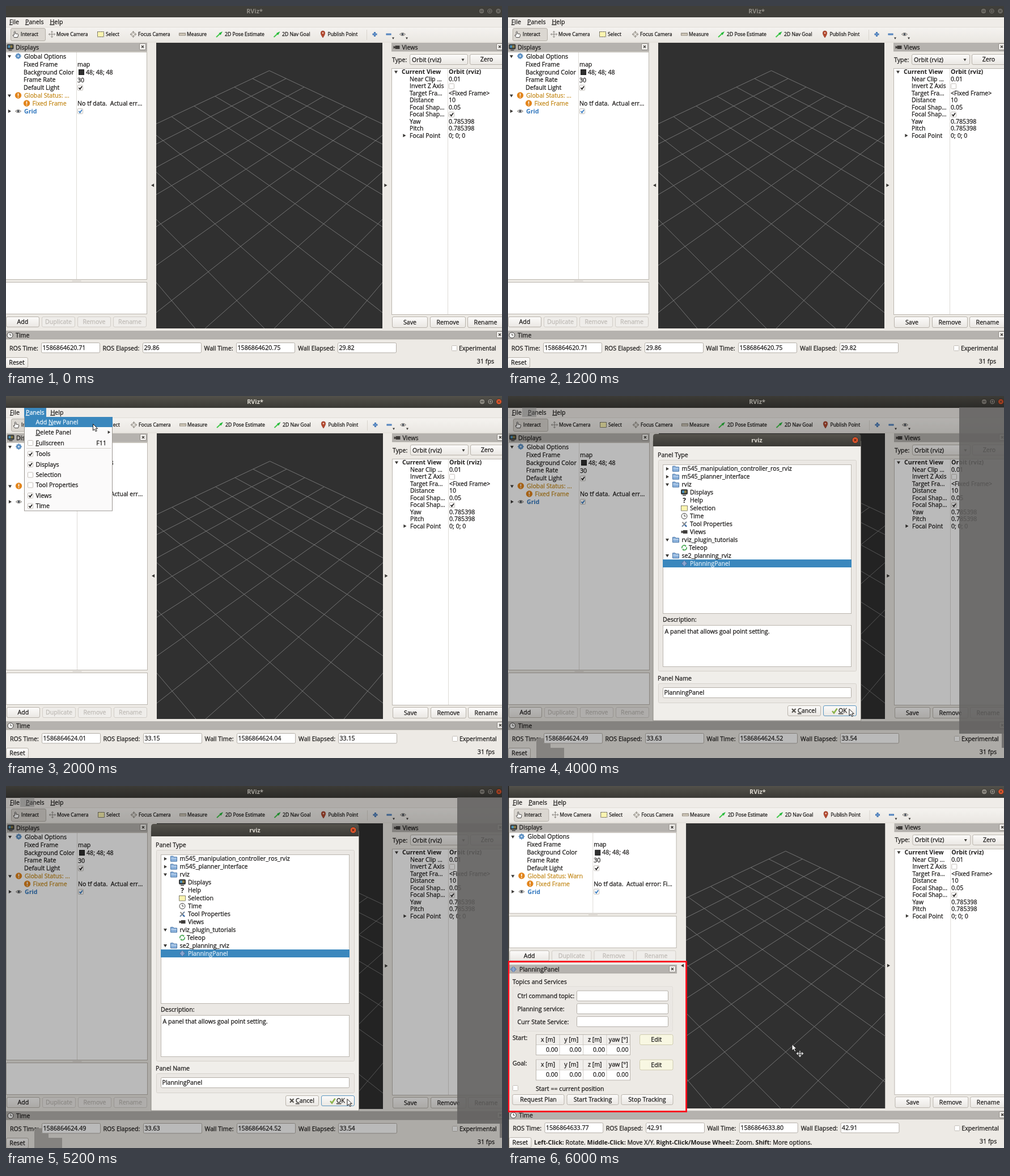
Animation, 875 px wide and 640 px high, one loop 8000 ms. Source, as an HTML page:

```html
<!DOCTYPE html>
<html lang="en">
<head>
<meta charset="utf-8">
<title>RViz</title>
<style>
html, body { margin: 0; width: 100%; height: 100%; overflow: hidden; background: #edeae5; }
#stage { display: block; width: 875px; height: 640px; }
text { font-family: "Open Sans", "Noto Sans", sans-serif; white-space: pre; stroke-width: .28px; }
.u { text-decoration: underline; }
.b { font-weight: bold; }
</style>
</head>
<body>
<svg id="stage" viewBox="0 0 875 640" xmlns="http://www.w3.org/2000/svg"></svg>
<script>
const STEP = 2000, BLUE = '#3a87bd', INK = '#1f1d1c', BAR = '#b5b2ae', EDGE = '#bbb6af';

// ---- primitives (y of text is its visual middle) ----
const rect = (x, y, w, h, fill, stroke = 'none', r = 0, more = '') =>
  `<rect x="${x}" y="${y}" width="${w}" height="${h}" rx="${r}" fill="${fill}" stroke="${stroke}" ${more}/>`;
const path = (d, stroke, w = 1, fill = 'none') =>
  `<path d="${d}" stroke="${stroke}" stroke-width="${w}" fill="${fill}"/>`;
const disc = (x, y, r, fill, stroke = 'none') =>
  `<circle cx="${x}" cy="${y}" r="${r}" fill="${fill}" stroke="${stroke}"/>`;
const text = (x, y, s, { size = 10.65, fill = INK, bold = false, at = 'start' } = {}) =>
  `<text x="${x}" y="${y + size * 0.34}" font-size="${size}" fill="${fill}" stroke="${bold ? 'none' : fill}" text-anchor="${at}"${bold ? ' class="b"' : ''}>${s}</text>`;
const key = (s, i = 0) => `${s.slice(0, i)}<tspan class="u">${s[i]}</tspan>${s.slice(i + 1)}`;
const move = (x, y, s) => `<g transform="translate(${x} ${y})">${s}</g>`;

// ---- widgets ----
const box = (x, y, w, h) => rect(x + .5, y + .5, w - 1, h - 1, '#fff', EDGE);
const field = (x, y, w, h, s = '') => rect(x + .5, y + .5, w - 1, h - 1, '#fff', '#b3aea7', 2) + text(x + 2.5, y + h / 2, s);
const button = (x, y, w, h, s, { off = false, fill = 'url(#btn)', edge = '#b8b3ab' } = {}) =>
  rect(x + .5, y + .5, w - 1, h - 1, off ? '#efedea' : fill, off ? '#d2cec8' : edge, 2.5) +
  text(x + w / 2, y + h / 2, s, { at: 'middle', fill: off ? '#bfbbb6' : INK });
const check = (x, y, on, fill = INK) => rect(x + .5, y + .5, 9, 9, '#fff', '#c3beb8', 1) +
  (on ? path(`M${x + 2.5} ${y + 5}l2 2.5 3.5-5`, fill, 1.7) : '');
const tri = (x, y, dir, s = 3, fill = '#3a3835') =>
  `<path d="M${-s} ${-s * .7}H${s}L0 ${s}Z" fill="${fill}" transform="translate(${x} ${y}) rotate(${{ d: 0, l: 90, r: -90 }[dir]})"/>`;
const shut = (x, y) => rect(x + .5, y + .5, 11, 11, '#f1efec', '#918d87', 1.5) +
  path(`M${x + 4} ${y + 4}l4 4m0-4l-4 4`, '#45423e', 1.5);
const dock = (x, y, w, title, tx) => rect(x, y, w, 15, BAR) + path(`M${x} ${y + 15}h${w}`, '#9f9b96', .7) + text(tx, y + 8, title);

// ---- icons, drawn around 0,0 ----
const icons = {
  hand: path('M-2.5 1V-4.500Q-1.500-6-.5-4.500V-1L4-.5Q5 0 4.500 2L3.500 5.500H-2.500L-5 2Q-4.500 0-2.500 2', '#4a4744', 1, '#fff'),
  cross: path('M0-5.500V5.500M-5.500 0H5.500M-1.800-3.700L0-5.500 1.800-3.700M-1.800 3.700L0 5.500 1.800 3.700M-3.700-1.800L-5.500 0-3.700 1.800M3.700-1.800L5.500 0 3.700 1.800', '#85827d', 1),
  select: rect(-5.5, -4.5, 11, 9, '#fbf4b0', '#5c5a4e', 0, 'stroke-dasharray="2 .7"'),
  focus: path('M0-5.500L5.500 0 0 5.500-5.500 0Z', '#aaa69f', 1, '#d7d3cc') + path('M0-5.500V5.500M-5.500 0H5.500', '#87837c', 1) + disc(0, 0, 1.6, '#f4f2ee'),
  ruler: rect(-5.5, -2, 11, 4, '#ddd5c5', '#8a8378') + path('M-3-2v2M0-2v2M3-2v2', '#736d63', .7),
  arrow: path('M-5.500 5L1.500-1.500', '#42c84a', 2) + path('M5.500-5L-1-2 2 1.500Z', 'none', 0, '#25b83a'),
  pin: path('M0 6Q-4 0-3.600-2.500A3.600 3.600 0 0 1 3.600-2.500Q4 0 0 6Z', '#8d3422', .7, '#b4492f') + disc(0, -2.3, 1.3, '#f0d3c9'),
  plus: path('M-4 0H4M0-4V4', '#3d70b0', 3) + path('M-3 0H3M0-3V3', '#76a4d8', 1),
  minus: path('M-4.500 0H4.500', '#3d70b0', 3) + path('M-3.500 0H3.500', '#76a4d8', 1),
  eye: path('M-5 0Q0-5 5 0Q0 5-5 0Z', '#77736d', 1, '#eceae6') + disc(0, 0, 2, '#4b525c'),
  screen: rect(-5.5, -5, 11, 8, '#2d3438', '#3b3a38', 1) + path('M-4-3.500H0V1H-4Z', 'none', 0, '#4c92b8') + path('M0-3.500H4V1H0Z', 'none', 0, '#8c7a42') + path('M-3 5H3', '#444', 1.6),
  gear: disc(0, 0, 4, '#6ea0d0', '#4f82b5') + path('M0-5.500V5.500M-5.500 0H5.500M-3.700-3.700L3.700 3.700M3.700-3.700L-3.700 3.700', '#5f91c3', 1.3) + disc(0, 0, 1.5, '#d9e7f4'),
  warn: disc(0, 0, 5.7, '#e2851c') + path('M0-3.500V1M0 2.200V3.700', '#fff', 1.6),
  camera: path('M-5.500-2.500L-2.500-1V-3H5.500V3H-2.500V1L-5.500 2.500Z', 'none', 0, '#3e3b39'),
  clock: disc(0, 0, 5, '#fafafa', '#403e3b') + path('M0-3V0H2.500', '#403e3b', 1),
  folder: path('M-5.500 4.500V-4.500H-1L0-3H5.500V4.500Z', '#4673a5', 1, '#8db3dd') + path('M-5-.8H5', '#d3e3f3', 1),
  tools: path('M-4 4.500L4-4', '#6b7f97', 2) + path('M4 4.500L-3.500-3.500', '#8d8984', 2) + path('M1 1.500L4 4.500', '#3c6fae', 2.4),
  cycle: path('M-4 1A4 4 0 0 1 2-3.500M4-1A4 4 0 0 1-2 3.500', '#52ad5c', 1.7) + path('M1-5.500L4-3 1-1.500ZM-1 5.500L-4 3-1 1.500Z', 'none', 0, '#52ad5c'),
  gem: path('M0-5L5 0 0 5-5 0Z', '#4d6ca0', 1, '#7f9dc9') + path('M0-5V5', '#aac0e0', .7),
  pointer: path('M0 0V11.500L2.700 9 4.700 13.200 6.700 12.300 4.700 8.200H8.200Z', '#1c1b1a', 1, '#fff')
};
const icon = (name, x, y) => move(x, y, icons[name]);

// ---- main window ----
const titleBar = live => {
  const rim = live ? '#8b8880' : '#6b6963';
  const dot = (x, fill) => disc(x, 9, 5, fill, '#35332f');
  return rect(-3, -2, 882, 22, live ? 'url(#bar)' : '#403f3a') +
    text(438.5, 9, 'RViz*', { bold: true, at: 'middle', size: 10.8, fill: live ? '#dcd8cf' : '#918e87' }) +
    dot(839, rim) + dot(853.5, rim) + dot(868.5, live ? '#e2562c' : rim) +
    path('M836.500 9h5', '#3a3834', 1) + rect(851.5, 7, 4, 4, 'none', '#3a3834') + path('M866.500 7l4 4m0-4l-4 4', '#3a3834', 1);
};

const toolBar = () => {
  const tools = [['hand', 17, 26, 'Interact'], ['cross', 81, 89, 'Move Camera'], ['select', 167, 176, 'Select'],
    ['focus', 224.5, 233, 'Focus Camera'], ['ruler', 311, 319, 'Measure'], ['arrow', 376.5, 386, '2D Pose Estimate'],
    ['arrow', 478, 487, '2D Nav Goal'], ['pin', 559, 567.5, 'Publish Point']];
  return rect(-3, 20, 882, 18, '#efece8') + rect(-3, 37, 882, 27, 'url(#tool)') +
    path('M-3 37.500H879M-3 64H879', '#dcd8d1', .8) +
    text(6, 28, key('File')) + text(34, 28, key('Panels')) + text(77.5, 28, key('Help')) +
    rect(8.5, 39.5, 61, 22, '#dbd7d1', '#b4afa7', 2.5) +
    tools.map(([n, ix, tx, s]) => icon(n, ix, 50) + text(tx, 50, s, { size: 8.65 })).join('') +
    path('M636.500 42V60', '#d8d4cd', 1) + icon('plus', 650.5, 50) + icon('minus', 675, 50) + icon('eye', 699.5, 50) +
    tri(683, 57, 'd', 2) + tri(707, 57, 'd', 2);
};

const displays = p => {
  const { w, col, foot, note } = p, warm = '#c58c20', v = col + 2;
  const rows = ['Fixed Frame', 'Background Color', 'Frame Rate', 'Default Light'];
  const names = ['Add', 'Duplicate', 'Remove', 'Rename'];
  return dock(0, 65, w, 'Displays', 17) + icon('screen', 7.5, 73) + shut(w - 14, 66) +
    box(-1, 81, w + 1, foot - 81) + path(`M${col + .5} 82V${foot - 1}`, '#dedbd7', 1) +
    tri(6, 89, 'd') + icon('gear', 21.5, 88.5) + text(32, 89, 'Global Options') +
    rows.map((s, i) => text(31, 103 + i * 13.9, s)).join('') +
    text(v, 103, 'map') + rect(v + 2.5, 112.5, 9, 9, '#303030', '#1d1d1d') + text(v + 15, 117, '48; 48; 48') + text(v, 131, '30') + check(v, 139.5, true) +
    tri(6, 158.5, 'd') + icon('warn', 21.5, 158) + text(32, 158.7, p.status, { fill: warm }) +
    icon('warn', 36.5, 172) + text(46.5, 172.7, 'Fixed Frame', { fill: warm }) + text(v, 172.7, p.error) +
    tri(6, 186, 'r') + icon('eye', 21.5, 186) + text(32, 186.5, 'Grid', { bold: true, fill: '#3278bf' }) + check(v, 181, true, '#3278bf') +
    path(`M${w / 2 - 8} ${foot + 2}h16`, '#c9c5bf', 1) +
    box(-1, foot + 4, w + 1, note) +
    names.map((s, i) => button(i * p.pitch, foot + note + 8, p.bw, 19, s, { off: i > 0 })).join('');
};

const view = (x, end) => {
  const cx = (end - x) / 2, f = 252.5 / Math.tan(Math.PI / 8), k = Math.SQRT1_2;
  const at = (a, b) => {
    const up = -(a + b) / 2, z = 10 + up;
    return `${(cx + f * (b - a) * k / z).toFixed(1)} ${(252.5 - f * up / z).toFixed(1)}`;
  };
  let d = '';
  for (let i = -5; i <= 5; i++) d += `M${at(i, -5)}L${at(i, 5)}M${at(-5, i)}L${at(5, i)}`;
  return `<svg x="${x}" y="65" width="${end - x}" height="505" overflow="hidden">` +
    rect(0, 0, end - x, 505, '#303030') + path(d, '#7c7c7c', .9) + '</svg>' +
    tri(x - 6, 317, 'l') + tri(669.5, 317, 'r');
};

const views = () => {
  const rows = [['Near Clip ...', '0.01'], ['Invert Z Axis', 0], ['Target Fra...', '&lt;Fixed Frame&gt;'], ['Distance', '10'],
    ['Focal Shap...', '0.05'], ['Focal Shap...', 1], ['Yaw', '0.785398'], ['Pitch', '0.785398'], ['Focal Point', '0; 0; 0']];
  return dock(680, 65, 199, 'Views', 698.5) + icon('camera', 689, 73) + shut(865, 66) +
    text(681, 95, 'Type:') + button(712, 85, 103, 19, '') + text(716, 95, 'Orbit (rviz)') + tri(806, 95, 'd', 2.5) +
    button(818, 85, 60, 19, 'Zero') +
    box(680, 110, 200, 436) + path('M779.500 111V545', '#dedbd7', 1) +
    tri(688, 116.5, 'd') + text(698, 116.8, 'Current View', { bold: true }) + text(781, 116.8, 'Orbit (rviz)', { bold: true }) +
    rows.map(([a, b], i) => {
      const y = 129.3 + i * 12.5;
      return text(712, y, a) + (typeof b === 'number' ? check(781, y - 5, b) : text(781, y, b));
    }).join('') + tri(702.5, 229, 'r') +
    button(681, 549, 63, 20, 'Save') + button(748, 549, 63, 20, 'Remove') + button(814, 549, 64, 20, 'Rename');
};

const timePanel = clock => {
  const parts = [['ROS Time:', 6, 62], ['ROS Elapsed:', 170.5, 241], ['Wall Time:', 349.5, 406], ['Wall Elapsed:', 515, 585]];
  return dock(-3, 574, 882, 'Time', 17) + icon('clock', 7, 582) + shut(865, 575) +
    parts.map(([s, x, fx], i) => text(x, 605, s) + field(fx, 595, 104, 18.5, clock[i])).join('') +
    check(786, 600, false) + text(799, 605, 'Experimental') +
    button(-1, 621, 40, 19, 'Reset') + text(861, 628, '31 fps', { at: 'end' });
};

const narrow = { w: 249, col: 124, foot: 484, note: 57, bw: 59, pitch: 63, status: 'Global Status: ...', error: 'No tf data.\u00a0 Actual err...', left: 265 };
const wide = { w: 295.5, col: 147, foot: 225, note: 57, bw: 70.5, pitch: 74.6, status: 'Global Status: Warn', error: 'No tf data.\u00a0 Actual error: Fi...', left: 312 };

const app = (live, clock, p = narrow) => rect(-3, 0, 882, 645, '#edeae5') + titleBar(live) + toolBar() +
  displays(p) + view(p.left, 664) + views() + timePanel(clock);

// ---- overlays ----
const panelMenu = () => {
  const items = [['Add New Panel', 46, 4], ['Delete Panel', 64.5, 0], ['Fullscreen', 83, 0], ['Tools', 102.5], ['Displays', 121],
    ['Selection', 139.5], ['Tool Properties', 157.5], ['Views', 176], ['Time', 194.5]];
  const ticks = [, , false, true, true, false, false, true, true];
  return rect(32, 21, 39, 16, BLUE) + text(35, 29, key('Panels'), { fill: '#fff' }) +
    rect(32.5, 37.5, 155, 165.5, '#fbfafa', '#9b9792') + rect(33, 37, 155, 18, BLUE) +
    items.map(([s, y, u], i) => (i > 1 ? check(38, y - 5, ticks[i]) : '') +
      text(52.5, y, u === undefined ? s : key(s, u), { fill: i ? INK : '#e9f3fa' })).join('') +
    text(177, 83, 'F11', { at: 'end' }) + tri(181.5, 64, 'r', 2.7) + path('M36 92.500H185', '#d6d2cd', 1) +
    icon('pointer', 153.5, 49.5);
};

const dialog = () => {
  const rows = [['r', 0, 'folder', 'm545_manipulation_controller_ros_rviz'], ['r', 0, 'folder', 'm545_planner_interface'], ['d', 0, 'folder', 'rviz'],
    ['', 1, 'screen', 'Displays'], ['', 1, '', 'Help'], ['', 1, 'select', 'Selection'], ['', 1, 'clock', 'Time'], ['', 1, 'tools', 'Tool Properties'],
    ['', 1, 'camera', 'Views'], ['d', 0, 'folder', 'rviz_plugin_tutorials'], ['', 1, 'cycle', 'Teleop'], ['d', 0, 'folder', 'se2_planning_rviz'],
    ['', 1, 'gem', 'PlanningPanel']];
  const frame = (y, h) => rect(265.5, y, 349, h, '#ebe8e4', '#d6d2cc', 2);
  return rect(256, 80, 366.5, 494, '#f0eeea', '#8c8984') +
    path('M256 89V72Q256 67 261 67H617.500Q622.500 67 622.500 72V89Z', 'none', 0, 'url(#bar)') +
    text(439, 78, 'rviz', { bold: true, at: 'middle', fill: '#dcd8cf' }) +
    disc(612.5, 78, 5.5, '#e2562c', '#35332f') + path('M610.500 76l4 4m0-4l-4 4', '#5c2413', 1.1) +
    text(264, 104.5, 'Panel Type') + frame(113.5, 373) + box(273, 121, 333, 264) + rect(273, 289, 333, 14, BLUE) +
    rows.map(([arrow, deep, ic, s], i) => {
      const y = 128.7 + i * 13.95, x = 296 + deep * 15;
      return (arrow ? tri(281, y, arrow) : '') + (ic ? icon(ic, x, y) : text(x, y, '?', { bold: true, at: 'middle', size: 12 })) +
        text(x === 296 ? 306.5 : ic === 'cycle' ? 319 : 321, y, s, { fill: i === 12 ? '#d9e9f4' : INK });
    }).join('') +
    text(273, 395, 'Description:') + box(273, 405, 333, 74) + text(276.5, 416, 'A panel that allows goal point setting.') +
    text(264, 499.5, 'Panel Name') + frame(508.5, 34) + field(273, 515, 333, 19, 'PlanningPanel') +
    button(493, 547, 59, 19, '') + path('M501 553l6.500 6.500m0-6.500l-6.500 6.500', '#55524e', 2.2) + text(511, 556.5, key('Cancel')) +
    button(556, 547, 59, 19, '', { edge: '#5b95bf' }) + path('M572 557l3 3.500 5.500-8', '#8cb34c', 2.6) + text(583, 556.5, key('OK')) +
    icon('pointer', 602, 553.5);
};

const patches = () => rect(796, 20, 79, 577, '#626160', 'none', 0, 'opacity=".86"') + rect(871, 597, 4, 25, '#757371') +
  rect(25, 20, 25, 17, '#6c6b6a', 'none', 0, 'opacity=".45"') +
  path('M50 605H63V614H75V622H99V640H50Z', 'none', 0, '#858380');

const table = (name, y) => {
  const cols = [50, 91, 132.5, 174, 215.5], heads = ['x [m]', 'y [m]', 'z [m]', 'yaw [°]'];
  return text(8, y + 5.5, name) + box(49, y - 1, 167, 37) + rect(50, y, 165, 17, '#f1efec') +
    path(`M50 ${y + 17.5}H215` + cols.slice(1, 4).map(x => `M${x} ${y}v35`).join(''), '#d0ccc6', 1) +
    heads.map((s, i) => text((cols[i] + cols[i + 1]) / 2, y + 8, s, { at: 'middle' }) +
      text(cols[i + 1] - 3, y + 26, '0.00', { at: 'end' })).join('') +
    button(232, y - 1, 59.5, 19, 'Edit', { fill: '#f8f7e2', edge: '#cfccb0' });
};

const planPanel = () => dock(2, 316, 296, 'PlanningPanel', 20) + icon('gem', 9.5, 324) + shut(284, 317.5) +
  text(8, 346, 'Topics and Services') + rect(8.5, 354.5, 282, 79, '#ebe8e4', '#d6d2cc', 2, 'stroke-dasharray="1 1"') +
  ['Ctrl command topic:', 'Planning service:', 'Curr State Service:'].map((s, i) =>
    text(16.5, 371.3 + i * 22.8, s) + field(121, 361.5 + i * 22.8, 162, 19)).join('') +
  table('Start:', 440) + table('Goal:', 484.5) +
  check(8, 529, false) + text(49, 535, 'Start == current position') +
  ['Request Plan', 'Start Tracking', 'Stop Tracking'].map((s, i) => button(7.5 + i * 96, 545, 92, 19, s)).join('') +
  rect(1, 310.5, 313.5, 265, 'none', '#fc0d1b', 0, 'stroke-width="2.8"');

const hint = () => {
  const b = s => `<tspan class="b" stroke="none">${s}</tspan>`;
  return text(46, 630.5, `${b('Left-Click:')} Rotate. ${b('Middle-Click:')} Move X/Y. ${b('Right-Click/Mouse Wheel:')}: Zoom. ${b('Shift:')} More options.`);
};

const orbitCursor = () => icon('pointer', 501, 456.5) +
  move(515, 473, path('M0-5V5M-5 0H5M-2 3L0 5.500 2 3M-3-2L-5.500 0-3 2M3-2L5.500 0 3 2', '#e8e8e8', 1.2));

const scenes = [
  app(false, ['1586864620.71', '29.86', '1586864620.75', '29.82']),
  move(1, 1, app(true, ['1586864624.01', '33.15', '1586864624.04', '33.15'])) + panelMenu(),
  move(1, 1, app(true, ['1586864624.49', '33.63', '1586864624.52', '33.54'])) + rect(0, 0, 875, 640, '#000', 'none', 0, 'opacity=".27"') + patches() + dialog(),
  `<g transform="matrix(.9985 0 0 .9985 2.5 1)">${app(true, ['1586864633.77', '42.91', '1586864633.80', '42.91'], wide)}</g>` +
    rect(0, 0, 1.5, 640, '#22211f') + planPanel() + hint() + orbitCursor()
];

const shade = (id, a, b) => `<linearGradient id="${id}" x2="0" y2="1"><stop stop-color="${a}"/><stop offset="1" stop-color="${b}"/></linearGradient>`;
const stage = document.getElementById('stage');
stage.innerHTML = `<defs>${shade('bar', '#54524b', '#3b3a36')}${shade('tool', '#f5f3f0', '#eae7e2')}${shade('btn', '#fcfbfa', '#eae7e3')}</defs>` +
  scenes.map(s => `<g class="scene" visibility="hidden">${s}</g>`).join('');

const layers = [...stage.querySelectorAll('.scene')], start = performance.now();
let shown = -1;
function tick() {
  const i = Math.floor((performance.now() - start) / STEP) % layers.length;
  if (i !== shown) {
    layers.forEach((g, n) => g.setAttribute('visibility', n === i ? 'visible' : 'hidden'));
    shown = i;
  }
  requestAnimationFrame(tick);
}
tick();
</script>
</body>
</html>
```
